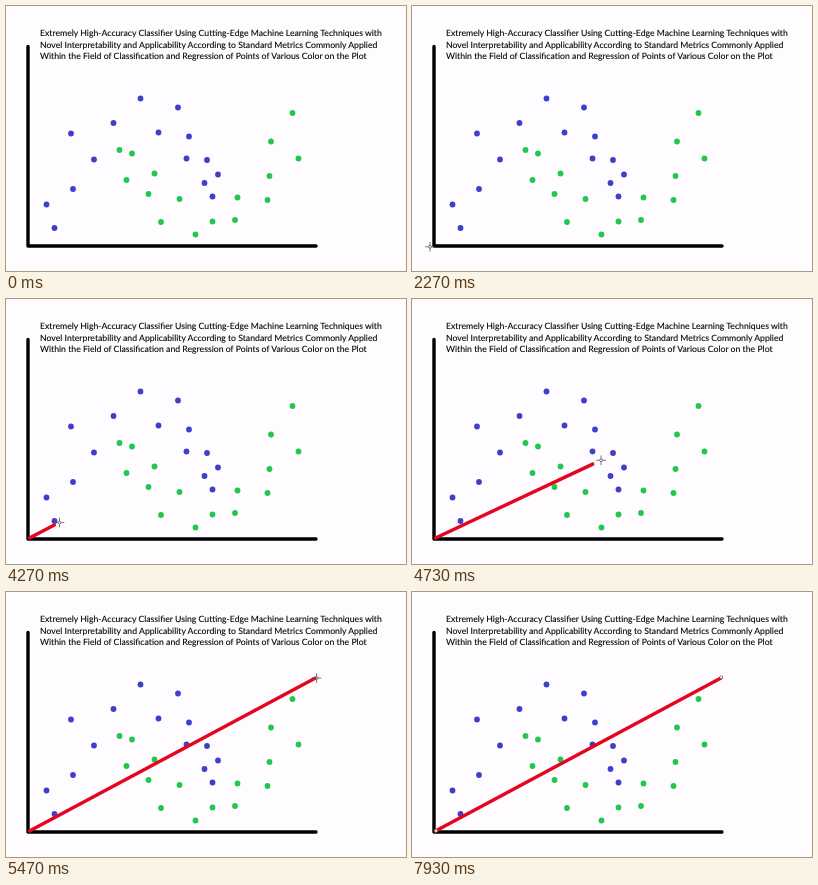
An HTML page for the animation above (8 s loop, 400 by 265 pixels).

```html
<!DOCTYPE html>
<html lang="en">
<head>
<meta charset="utf-8">
<title>Linear classifier</title>
<style>
  html, body { margin: 0; width: 100%; height: 100%; overflow: hidden; background: #fefcff; }
  svg { display: block; width: 400px; height: 265px; }
  text { font: 8.7px Lato, sans-serif; fill: #000; stroke: #000; stroke-width: .1; text-rendering: geometricPrecision; }
  #axes { fill: none; stroke: #000; stroke-width: 3.4; stroke-linecap: round; stroke-linejoin: round; }
  #fit { stroke: #e4061f; stroke-width: 3.5; stroke-linecap: round; }
  #cursor { fill: none; stroke: #555; stroke-width: .8; }
  #handles { fill: #fff; stroke: #777; stroke-width: .7; }
</style>
</head>
<body>
<svg viewBox="0 0 400 265">
  <text x="34" y="30.3">Extremely High-Accuracy Classifier Using Cutting-Edge Machine Learning Techniques with</text>
  <text x="34" y="41.8">Novel Interpretability and Applicability According to Standard Metrics Commonly Applied</text>
  <text x="34" y="53.3">Within the Field of Classification and Regression of Points of Various Color on the Plot</text>
  <path id="axes" d="M22 40.5V240H310"/>
  <g id="dots"></g>
  <line id="fit" x1="23.5" y1="239"/>
  <g id="handles">
    <rect x="22.8" y="237.6" width="2.4" height="2.4"/>
    <rect x="308" y="84" width="2.4" height="2.4"/>
  </g>
  <path id="cursor" d="M-4.8 0H-1.4M1.4 0H4.8M0-4.8V-1.4M0 1.4V4.8M-1.4 0A1.4 1.4 0 1 1 1.4 0A1.4 1.4 0 1 1-1.4 0"/>
</svg>
<script>
const LOOP = 8000, FPS = 15, TRAIL = 26;
const PRESS = 3970, RELEASE = 5800, LEAVE = 7070, GONE = 7530;
const $ = id => document.getElementById(id);

// The plotted data: one list of points per class
const dots = {
  '#3f3fc8': [[134.5, 92.5], [172, 101.5], [107.5, 117], [65, 127.5], [152.5, 126.5], [183, 130.5],
    [88, 153.5], [180.5, 152.5], [201, 154], [212, 168.5], [198.5, 177], [206.5, 190.5],
    [67, 183], [40.5, 198.5], [48.5, 222]],
  '#20c94c': [[286.5, 107], [265, 135.5], [292.5, 152.5], [263.5, 170], [261.5, 194], [231.5, 191.5],
    [229, 214], [206.5, 215.5], [189.5, 228.5], [155, 216], [173.5, 193], [142.5, 188],
    [120.5, 174], [148.5, 167.5], [113.5, 144], [126, 147.5]]
};
$('dots').innerHTML = Object.entries(dots).map(([fill, points]) =>
  points.map(([x, y]) => `<circle cx="${x}" cy="${y}" r="2.9" fill="${fill}"/>`).join('')).join('');

const ramp = (t, from, to) => Math.min(1, Math.max(0, (t - from) / (to - from)));
const smooth = u => u * u * (3 - 2 * u);
const mix = (a, b, k) => a + (b - a) * k;

// Drift to the origin, drag to the far end, then wander off
function pointer(t) {
  if (t < PRESS) {
    const k = ramp(t, 930, 2570);
    return [mix(-6.2, 23.5, k), mix(248.5, 239, k)];
  }
  if (t < LEAVE) {
    return [mix(23.5, 310.5, smooth(ramp(t, 4000, 5330))),
            mix(239, 86, smooth(ramp(t, PRESS, 5480)))];
  }
  const k = ramp(t, LEAVE, GONE);
  return [mix(310.5, 327, k), mix(86, 40, k)];
}

const show = (id, on) => $(id).setAttribute('visibility', on ? 'visible' : 'hidden');

function draw(now) {
  const step = 1000 / FPS;
  const t = Math.floor((now % LOOP + 3.4) / step) * step;
  $('cursor').setAttribute('transform', `translate(${pointer(t)})`);
  // The drawn line trails the pointer slightly
  const [x, y] = pointer(Math.min(t, RELEASE) - TRAIL);
  $('fit').setAttribute('x2', Math.min(x, 309));
  $('fit').setAttribute('y2', y);
  show('cursor', t < GONE);
  show('fit', t > PRESS + TRAIL);
  show('handles', t >= RELEASE);
}

const start = performance.now();
function tick() {
  draw(performance.now() - start);
  requestAnimationFrame(tick);
}
tick();
</script>
</body>
</html>
```
